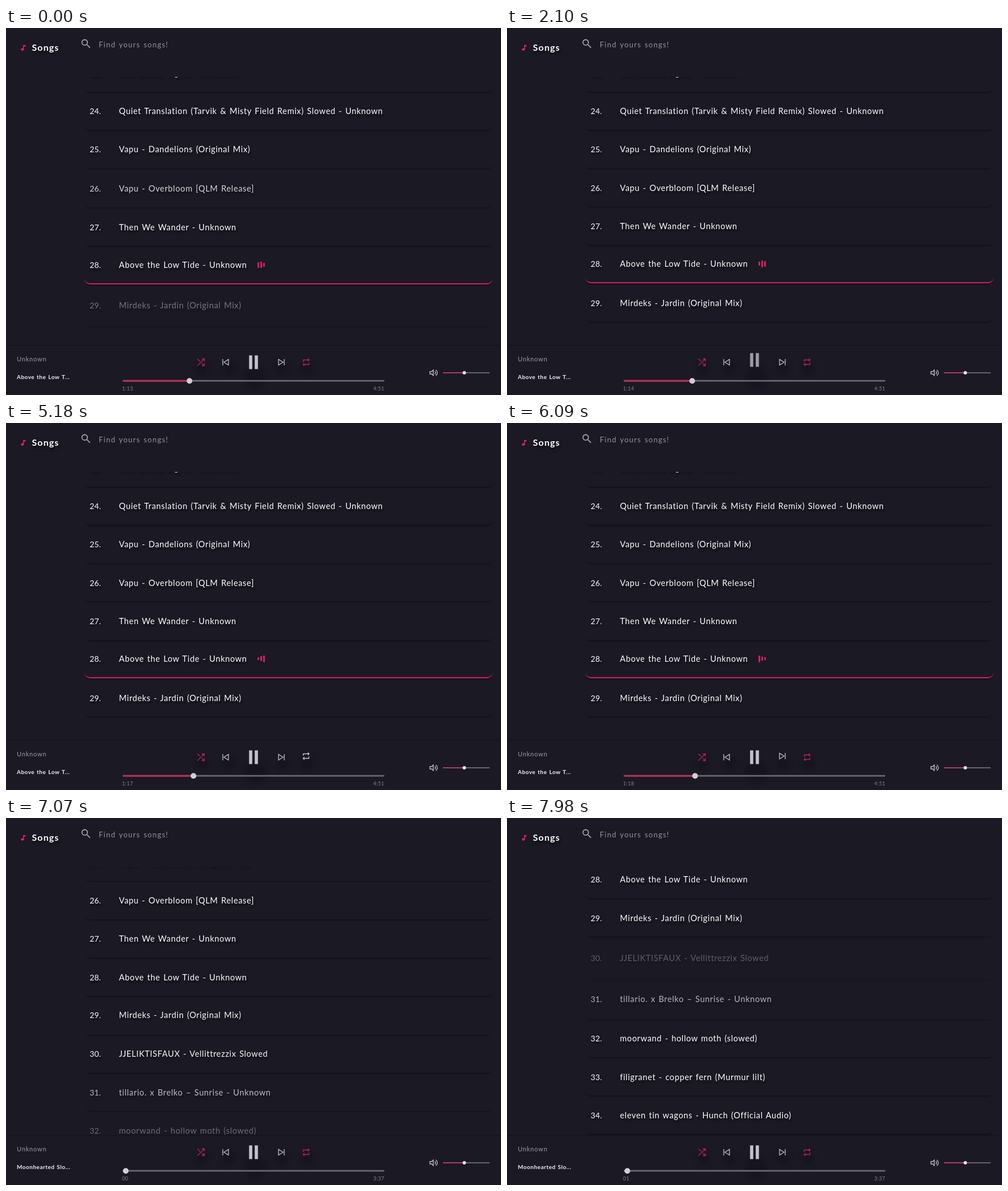
An HTML page for the animation above (8 s loop, 870x644 px).

```html
<!DOCTYPE html>
<html lang="en">
<head>
<meta charset="utf-8">
<title>Songs</title>
<style>
  html, body { margin: 0; width: 100%; height: 100%; overflow: hidden; background: #1b1924; }
  body { position: relative; font-family: Lato, "Open Sans", sans-serif; color: #fff; }
  #list { position: absolute; left: 0; top: 86px; width: 870px; height: 470px; overflow: hidden; }
  .row {
    position: absolute; left: 138px; width: 717px; box-sizing: border-box;
    border-bottom: 0 solid; border-radius: 0 0 10px 10px;
    box-shadow: 0 4px 3px -3px #0d0b13;
    font-size: 14.5px; letter-spacing: .65px; word-spacing: 1.2px; white-space: pre;
  }
  .row span { position: absolute; top: 50%; line-height: 20px; margin-top: -9px; text-shadow: 2px 4px 3px rgba(0, 0, 0, .5); }
  .row .number { left: 9px; font-size: 14px; letter-spacing: .1px; }
  .row .title { left: 60.5px; }
  .row i { position: absolute; width: 3.6px; background: #d3205c; border-radius: 1px; }
  svg { position: absolute; left: 0; top: 0; }
  .line { fill: none; stroke: currentColor; stroke-width: 1.3; }
  .blob { fill: #100e17; opacity: .45; filter: blur(4px); }
  .small { font-size: 9px; letter-spacing: .4px; fill: #84828c; }
</style>
</head>
<body>
<div id="list"></div>
<svg width="870" height="644" viewBox="0 0 870 644">
  <g fill="#e0245e">
    <ellipse cx="28.8" cy="37.6" rx="2.6" ry="2.2"/>
    <path d="M30 30H34.3V32.6H31.5V38H30Z"/>
  </g>
  <text x="45.5" y="40" font-size="16" font-weight="700" letter-spacing="1.1" fill="#fff"
    style="filter: drop-shadow(2px 4px 2px rgba(0,0,0,.55))">Songs</text>
  <g fill="none" stroke="#a3a1aa" stroke-width="1.8">
    <circle cx="138.3" cy="25.3" r="4.8"/><path d="M141.8 28.8L147.6 34.6"/>
  </g>
  <text x="163" y="33.5" font-size="13" letter-spacing="1.25" word-spacing="1.2" fill="#94929c">Find yours songs!</text>

  <path d="M0 557H870" stroke="#14121b" stroke-width="2" opacity=".7"/>
  <text x="19" y="585" font-size="11" letter-spacing=".8" fill="#9c9aa4">Unknown</text>
  <text id="playing" x="19" y="616" font-size="10" font-weight="700" letter-spacing=".5" word-spacing="1" fill="#f0eff3"></text>

  <circle class="blob" cx="344.5" cy="597" r="11"/>
  <circle class="blob" cx="392" cy="597" r="11"/>
  <circle class="blob" cx="438" cy="613" r="19"/>
  <circle class="blob" cx="485" cy="597" r="11"/>
  <circle class="blob" cx="529.5" cy="597" r="11"/>
  <g color="#c3c2c8">
    <path id="shuffle" class="line" d="M-6 6L6-6M1.5-6H6V-1.5M-6-6L-1.5-1.5M1.5 1.5L6 6M6 1.5V6H1.5"/>
    <path class="line" transform="translate(386 586.5)" d="M-5-5.5V5.5M5 5L-3 0L5-5Z"/>
    <path id="pause" fill="currentColor" d="M-7.8-12H-2.2V12H-7.8ZM2.2-12H7.8V12H2.2Z"/>
    <path id="play" fill="currentColor" d="M-7-12L9 0L-7 12Z"/>
    <path id="next" class="line" d="M5-5.5V5.5M-5 5L3 0L-5-5Z"/>
    <path id="repeat" class="line" d="M-5-.5V-4H5M3-6.3L5.3-4L3-1.7M5 .5V4H-5M-3 6.3L-5.3 4L-3 1.7"/>
    <path class="line" transform="translate(752 605)" d="M-7-2H-4L-1-5V5L-4 2H-7ZM2-2.5Q4 0 2 2.5M3.5-5Q9 0 3.5 5"/>
  </g>

  <rect x="205" y="617.8" width="460" height="2.6" rx="1.3" fill="#6b686e"/>
  <rect id="progress" x="205" y="617.8" height="2.6" rx="1.3" fill="#c02a5a"/>
  <circle id="knob" cy="619.3" r="5" fill="#d0cfd4"/>
  <text id="elapsed" class="small" x="204" y="636"></text>
  <text id="total" class="small" x="665" y="636" text-anchor="end"></text>

  <path d="M768 605H850" stroke="#67636b" stroke-width="1.8"/>
  <path d="M768 605H806" stroke="#b03a66" stroke-width="1.8"/>
  <circle cx="805.5" cy="605" r="3" fill="#e4e3e8"/>
</svg>
<script>
const LOOP = 8000, PITCH = 67.3, FIRST = 23, ACTIVE = 28;
const LIST_TOP = 86, FIRST_TOP = 44.2;
const ACCENT = "#d3205c", TOGGLED = "#b92556";
const SKIPPED_AT = 6160, LOADED_AT = 7000;

const titles = [
  "Soft Gravel Lights - Unknown",
  "Quiet Translation (Tarvik & Misty Field Remix) Slowed - Unknown",
  "Vapu - Dandelions (Original Mix)",
  "Vapu - Overbloom [QLM Release]",
  "Then We Wander - Unknown",
  "Above the Low Tide - Unknown",
  "Mirdeks - Jardin (Original Mix)",
  "JJELIKTISFAUX - Vellittrezzix Slowed",
  "tillario. x Brelko – Sunrise - Unknown",
  "moorwand - hollow moth (slowed)",
  "filigranet - copper fern (Murmur lilt)",
  "eleven tin wagons - Hunch (Official Audio)",
];

// Start time, knob position, elapsed label
const progressSteps = [
  [0, 322.5, "1:13"], [600, 324, "1:14"], [1900, 325.5, "1:14"],
  [2800, 326.5, "1:15"], [3500, 327.5, "1:16"], [4100, 328.5, "1:16"],
  [4700, 329.5, "1:17"], [5900, 330.5, "1:18"],
  [LOADED_AT, 210.5, "00"], [7700, 211.5, "01"],
];

const $ = id => document.getElementById(id);
const ramp = (t, a, b) => {
  const x = Math.min(1, Math.max(0, (t - a) / (b - a)));
  return x * x * (3 - 2 * x);
};
const pulse = (t, a, b, c, d) => ramp(t, a, b) - ramp(t, c, d);

function add(parent, tag, className, text = "") {
  const el = document.createElement(tag);
  el.className = className;
  el.textContent = text;
  return parent.appendChild(el);
}

const rows = titles.map((title, i) => {
  const el = add($("list"), "div", "row");
  add(el, "span", "number", FIRST + i + ".");
  add(el, "span", "title", title);
  return { el, number: FIRST + i };
});
const activeRow = rows[ACTIVE - FIRST].el;
const touchedRow = rows[ACTIVE + 1 - FIRST].el;
const bars = [0, 1, 2].map(i => {
  const bar = add(activeRow, "i", "");
  bar.style.left = 303.5 + 5 * i + "px";
  return bar;
});
const barPhases = [6.78, 8.7, 9.93];

// The picture stands still during two short stalls
function stall(t) {
  if (t > 2240 && t < 2800) return 2240;
  if (t > 6230 && t < 6720) return 6230;
  return t;
}

// Music time: halted by the pause button, then by the stall
function barClock(t) {
  if (t < 1000) return t;
  if (t < 2012) return 1000;
  return t < 2800 ? t - 1012 : t - 1289;
}

const touch = t => pulse(t, 6130, 6300, 6820, 7100);

function hover(number, t) {
  switch (number) {
    case 26: return .18 * (1 - ramp(t, 0, 450));
    case 29: return .6 * (1 - ramp(t, 0, 800)) + .3 * touch(t);
    case 30: return .7 * ramp(t, 7750, 7980);
    case 31: return .8 * pulse(t, 7550, 7750, 7850, 8080);
    default: return 0;
  }
}

function drawList(t) {
  const scroll = 172 * ramp(t, 6740, 7210) + 135 * ramp(t, 7520, 7900);
  let top = FIRST_TOP - LIST_TOP - scroll;
  for (const { el, number } of rows) {
    const dim = hover(number, t);
    const height = PITCH + 9.5 * dim;
    const delay = 60 * (number - 30);
    const entered = number < 30 ? 1 : ramp(t, 6850 + delay, 7100 + delay);
    el.style.top = top + "px";
    el.style.height = height + "px";
    el.style.opacity = (1 - dim) * entered;
    top += height;
  }
  const playing = t < SKIPPED_AT;
  const touched = touch(t);
  activeRow.style.borderBottom = playing ? "2px solid " + ACCENT : "0 solid";
  touchedRow.style.color = `color-mix(in srgb, #e0709f ${touched * 90}%, #fff)`;
  touchedRow.style.borderBottom = touched > .02 ? `1px solid rgba(210,208,216,${touched})` : "0 solid";
  bars.forEach((bar, i) => {
    const h = 8.5 + 3.5 * Math.sin(barClock(t) * 2 * Math.PI / 586 + barPhases[i]);
    bar.style.display = playing ? "" : "none";
    bar.style.height = h + "px";
    bar.style.top = 33.2 - h / 2 + "px";
  });
}

function place(id, x, y, color = "") {
  $(id).setAttribute("transform", `translate(${x} ${y})`);
  $(id).style.color = color;
}

function drawControls(t) {
  const pauseY = 586.5 - 4 * pulse(t, 500, 800, 2810, 3100);
  const paused = t >= 1000 && t < 2012;
  place("pause", 435, pauseY);
  place("play", 435, pauseY);
  $("pause").style.opacity = paused ? 0 : t < 1000 ? 1 : .5 + .5 * ramp(t, 2012, 2180);
  $("play").style.opacity = paused ? 1 : 0;

  const shuffleLift = 2 * pulse(t, 3500, 3700, 4350, 4550);
  const repeatLift = 2 * (pulse(t, 2950, 3150, 3350, 3550) + pulse(t, 4700, 4900, 5600, 5800));
  place("shuffle", 342.5, 586.5 - shuffleLift, t < 3750 || t >= 4250 ? TOGGLED : "");
  place("repeat", 527.5, 586.5 - repeatLift, t < 3200 || t >= 5400 ? TOGGLED : "");
  place("next", 484, 586.5 - 2 * pulse(t, 5850, 6050, 6160, 6400));

  const [, x, label] = progressSteps.findLast(step => step[0] <= t);
  $("knob").setAttribute("cx", x);
  $("progress").setAttribute("width", t < LOADED_AT ? x - 205 : 0);
  $("elapsed").textContent = label;
  $("total").textContent = t < LOADED_AT ? "4:51" : "3:37";
  $("playing").textContent = t < SKIPPED_AT ? "Above the Low T..." : "Moonhearted Slo...";
}

const start = performance.now();
function frame() {
  const t = stall((performance.now() - start) % LOOP);
  drawList(t);
  drawControls(t);
  requestAnimationFrame(frame);
}
frame();
</script>
</body>
</html>
```
